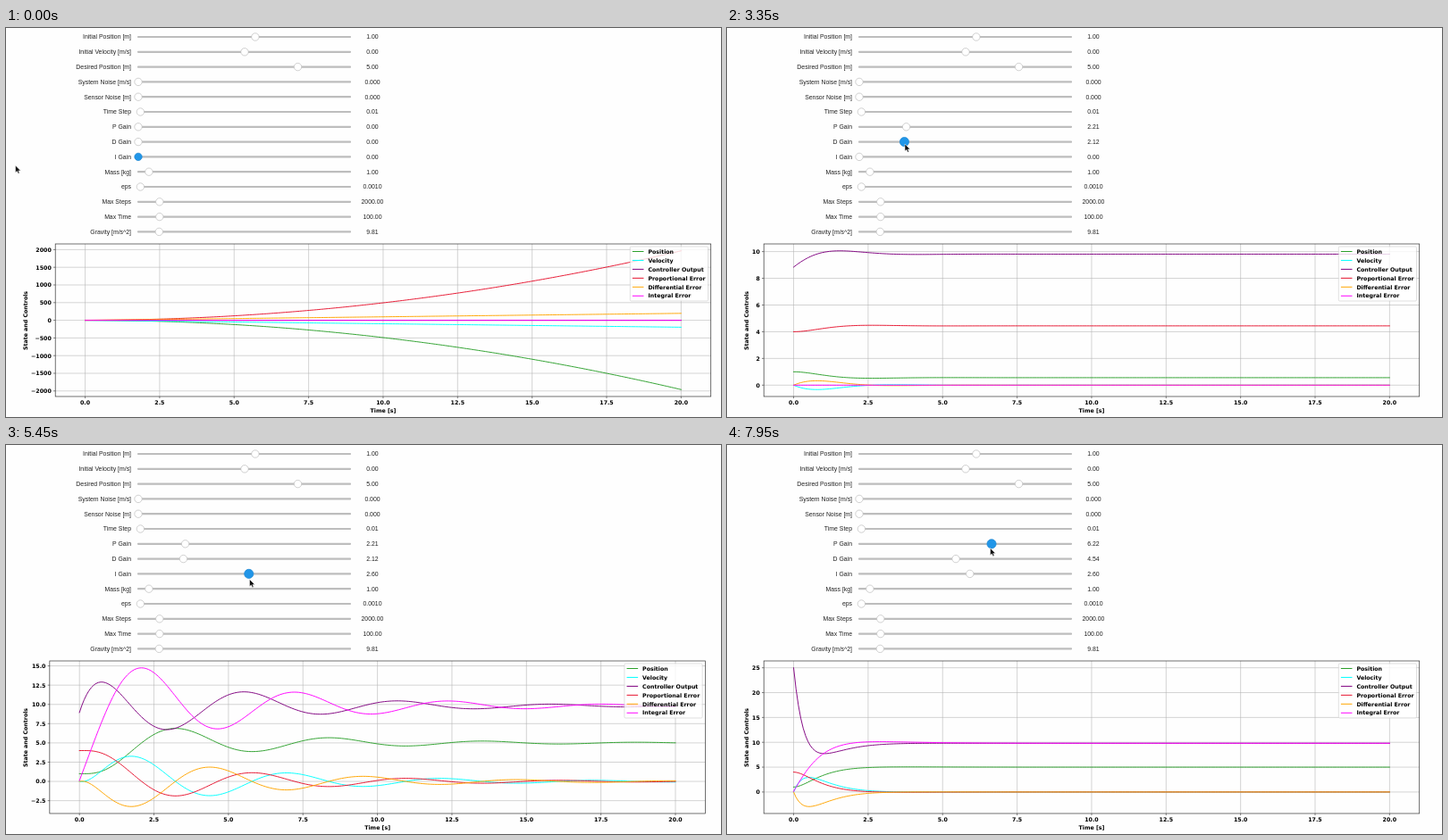
Recreate the animation shown at these times as an HTML page. Size 800 by 436 pixels, loop 8 s.

```html
<!DOCTYPE html>
<html lang="en">
<head>
<meta charset="utf-8">
<title>PID controller</title>
<style>
  html, body { margin: 0; width: 100%; height: 100%; overflow: hidden; background: #fefefe; }
  svg { display: block; width: 800px; height: 436px; }
  .ui text { font: 6.9px "Liberation Sans", Arial, sans-serif; fill: #222; }
  .plot text { font: bold 6.28px "DejaVu Sans", sans-serif; fill: #000; }
  .track { fill: #bdbdbd; }
  .grid { stroke: #b0b0b0; stroke-width: .55; }
  .tick { stroke: #222; stroke-width: .55; }
  .frame { fill: none; stroke: #333; stroke-width: .7; }
  .curve { fill: none; stroke-width: .95; stroke-linejoin: round; stroke-linecap: square; }
</style>
</head>
<body>
<svg id="stage" viewBox="0 0 800 436" xmlns="http://www.w3.org/2000/svg"></svg>
<script>
const LOOP = 8000, LAG = 200;
const TOP = 242, BOTTOM = 413, WIDTH = 733.5, EM = 6.28;
const DT = 0.01, STEPS = 2000, GRAVITY = 9.81, START = 1, GOAL = 5;

const ROWS = [
  ['Initial Position [m]', '1.00', .55],
  ['Initial Velocity [m/s]', '0.00', .5],
  ['Desired Position [m]', '5.00', .75],
  ['System Noise [m/s]', '0.000', 0],
  ['Sensor Noise [m]', '0.000', 0],
  ['Time Step', '0.01', .01],
  ['P Gain', '0.00', 0],
  ['D Gain', '0.00', 0],
  ['I Gain', '0.00', 0],
  ['Mass [kg]', '1.00', .05],
  ['eps', '0.0010', .01],
  ['Max Steps', '2000.00', .1],
  ['Max Time', '100.00', .1],
  ['Gravity [m/s^2]', '9.81', .098]
];

const SERIES = [
  ['Position', '#2ca02c'],
  ['Velocity', '#00ffff'],
  ['Controller Output', '#800080'],
  ['Proportional Error', '#e6142f'],
  ['Differential Error', '#ffa500'],
  ['Integral Error', '#ff00ff']
];

// Gains: value keys, spans in focus and spans while pressed
const GAINS = [
  { row: 6, max: 10,
    keys: [[620, 0], [680, .02], [1150, 1.6], [1300, 2.21], [7350, 2.21], [7600, 4.2], [7750, 6.22]],
    focus: [[620, 2550], [7250, LOOP]], press: [[620, 1340], [7330, LOOP]] },
  { row: 7, max: 10,
    keys: [[2480, 0], [2900, 1.2], [3300, 2.12], [6130, 2.12], [6650, 4.27], [6850, 4.39], [7050, 4.54]],
    focus: [[2350, 3650], [6050, 7250]], press: [[2500, 3400], [6100, 7080]] },
  { row: 8, max: 5,
    keys: [[3750, 0], [4150, 1.83], [4350, 2.21], [4700, 2.6]],
    focus: [[0, 620], [3650, 6050]], press: [[3750, 5600]] }
];

const CURSOR = [
  [50, 10.5, 154], [550, 147.5, 105], [620, 147.5, 106], [1150, 185, 107], [1300, 199.5, 108],
  [1800, 199.5, 108], [2250, 149.5, 125.5], [2480, 149.5, 125.5], [2900, 177, 129], [3300, 199, 130],
  [3420, 199, 130], [3700, 148.5, 146], [3750, 148.5, 146], [4150, 235, 149], [4350, 253.5, 150],
  [4700, 272.5, 150.5], [5550, 272.5, 150.5], [5850, 204, 107], [6050, 198, 130], [6130, 198, 131],
  [6650, 247.5, 132.5], [6850, 250, 132.5], [7050, 254, 132.5], [7280, 200, 113], [7350, 200, 114],
  [7600, 247, 115], [7750, 294.5, 115.5]
];

const stage = document.getElementById('stage');

function el(tag, attrs, parent, text) {
  const node = document.createElementNS('http://www.w3.org/2000/svg', tag);
  for (const k in attrs) node.setAttribute(k, attrs[k]);
  if (text !== undefined) node.textContent = text;
  parent.appendChild(node);
  return node;
}
const set = (node, attrs) => { for (const k in attrs) node.setAttribute(k, attrs[k]); };
const within = (spans, t) => spans.some(([a, b]) => t >= a && t < b);

function track(keys, t, i = 1) {
  if (t <= keys[0][0]) return keys[0][i];
  for (let n = 1; n < keys.length; n++) {
    const a = keys[n - 1], b = keys[n];
    if (t < b[0]) return a[i] + (b[i] - a[i]) * (t - a[0]) / (b[0] - a[0]);
  }
  return keys[keys.length - 1][i];
}
const gainAt = (gain, t) => Math.round(track(gain.keys, t) * 100) / 100;

// Explicit Euler run of the controlled mass
function simulate(kp, kd, ki) {
  const data = SERIES.map(() => []);
  let x = START, v = 0, sum = 0;
  for (let n = 0; n <= STEPS; n++) {
    const err = GOAL - x;
    sum += err * DT;
    const out = kp * err - kd * v + ki * sum;
    if (n % 8 === 0) [x, v, out, err, -v, ki * sum].forEach((y, i) => data[i].push(y));
    x += v * DT;
    v += (out - GRAVITY) * DT;
  }
  return data;
}

function niceStep(range) {
  const raw = range / 9, mag = 10 ** Math.floor(Math.log10(raw));
  return mag * [1, 2, 2.5, 5, 10].find(m => m * mag >= raw * .9999);
}
function decimals(step) {
  let d = 0;
  while (Math.abs(step * 10 ** d - Math.round(step * 10 ** d)) > 1e-6) d++;
  return d;
}
const labelWidth = s => [...s].reduce((w, c) => w + (c === '.' ? .38 : c === '−' ? .838 : .696), 0);

// Slider panel
const ui = el('g', { class: 'ui' }, stage);
const handles = [], values = [];
ROWS.forEach(([name, value, pos], i) => {
  const y = 10 + i * 16.8;
  el('text', { x: 140, y: y + 2.4, 'text-anchor': 'end' }, ui, name);
  el('rect', { class: 'track', x: 147, y: y - 1.1, width: 239, height: 2.2, rx: .8 }, ui);
  handles.push(el('circle', { cx: 148 + 238 * pos, cy: y, r: 4.2, fill: '#fff', stroke: '#bdbdbd', 'stroke-width': .7 }, ui));
  values.push(el('text', { x: 410, y: y + 2.4, 'text-anchor': 'middle' }, ui, value));
});

// Plot
const plot = el('g', { class: 'plot' }, stage);
el('text', { transform: 'translate(24.3 328) rotate(-90)', 'text-anchor': 'middle' }, plot, 'State and Controls');
const yAxis = el('g', {}, plot);
const body = el('g', {}, plot);
for (let i = 0; i <= 8; i++) {
  const x = (i * 2.5 + 1) / 22 * WIDTH;
  el('line', { class: 'grid', x1: x, x2: x, y1: TOP, y2: BOTTOM }, body);
  el('line', { class: 'tick', x1: x, x2: x, y1: BOTTOM, y2: BOTTOM + 2.2 }, body);
  el('text', { x, y: 421.9, 'text-anchor': 'middle' }, body, (i * 2.5).toFixed(1));
}
el('text', { x: WIDTH / 2, y: 431.2, 'text-anchor': 'middle' }, body, 'Time [s]');
const curves = SERIES.map(([, color]) => el('polyline', { class: 'curve', stroke: color }, body));
el('rect', { class: 'frame', x: 0, y: TOP, width: WIDTH, height: BOTTOM - TOP }, body);

const legend = el('g', { transform: `translate(${WIDTH - 90.4} 0)` }, body);
el('rect', { x: 0, y: 245, width: 87.2, height: 61, rx: 1.3, fill: '#fff', 'fill-opacity': .8, stroke: '#ccc', 'stroke-width': .6 }, legend);
SERIES.forEach(([name, color], i) => {
  const y = 250.5 + i * 9.95;
  el('line', { x1: 2.6, x2: 15.2, y1: y, y2: y, stroke: color, 'stroke-width': 1 }, legend);
  el('text', { x: 20.1, y: y + 2.2 }, legend, name);
});

const cursor = el('path', {
  d: 'M0 0V8L1.9 6.4L3.2 9.2L4.6 8.6L3.4 5.9H5.9Z',
  fill: '#111', stroke: '#fff', 'stroke-width': .5
}, stage);

function drawPlot(kp, kd, ki) {
  const data = simulate(kp, kd, ki), all = data.flat();
  let lo = Math.min(...all), hi = Math.max(...all);
  const pad = (hi - lo) * .05;
  lo -= pad;
  hi += pad;
  const toY = v => BOTTOM - (v - lo) / (hi - lo) * (BOTTOM - TOP);

  const step = niceStep(hi - lo), places = decimals(step), ticks = [];
  for (let n = Math.ceil(lo / step); n * step <= hi; n++) {
    ticks.push([toY(n * step), (n < 0 ? '−' : '') + Math.abs(n * step).toFixed(places)]);
  }
  const widest = Math.max(...ticks.map(([, s]) => labelWidth(s)));
  const left = 41.2 + (widest - 1.392) * EM;

  yAxis.replaceChildren();
  for (const [y, label] of ticks) {
    el('line', { class: 'grid', x1: left, x2: left + WIDTH, y1: y, y2: y }, yAxis);
    el('line', { class: 'tick', x1: left - 2.2, x2: left, y1: y, y2: y }, yAxis);
    el('text', { x: left - 4.4, y: y + 2.4, 'text-anchor': 'end' }, yAxis, label);
  }
  body.setAttribute('transform', `translate(${left} 0)`);
  data.forEach((ys, i) => {
    const last = ys.length - 1;
    curves[i].setAttribute('points', ys.map((v, n) =>
      ((n / last * 20 + 1) / 22 * WIDTH).toFixed(2) + ',' + toY(v).toFixed(2)).join(' '));
  });
}

let plotted = '';
function render(t) {
  for (const gain of GAINS) {
    const v = gainAt(gain, t), on = within(gain.focus, t);
    set(handles[gain.row], {
      cx: 148 + 238 * v / gain.max,
      r: within(gain.press, t) ? 5.1 : 4.2,
      fill: on ? '#2196e8' : '#fff',
      stroke: on ? '#1c86d1' : '#bdbdbd'
    });
    values[gain.row].textContent = v.toFixed(2);
  }
  set(cursor, { transform: `translate(${track(CURSOR, t, 1)} ${track(CURSOR, t, 2)})` });

  // The plot trails behind the sliders
  const [kp, kd, ki] = GAINS.map(gain => gainAt(gain, t - LAG));
  const key = [kp, kd, ki].join();
  if (key !== plotted) {
    plotted = key;
    drawPlot(kp, kd, ki);
  }
}

// Three pictures per 200 ms
function snap(t) {
  const r = t % 200;
  return t - r + (r < 50 ? 0 : r < 150 ? 50 : 150);
}

const began = performance.now();
function loop() {
  render(snap((performance.now() - began) % LOOP));
  requestAnimationFrame(loop);
}
loop();
</script>
</body>
</html>
```
